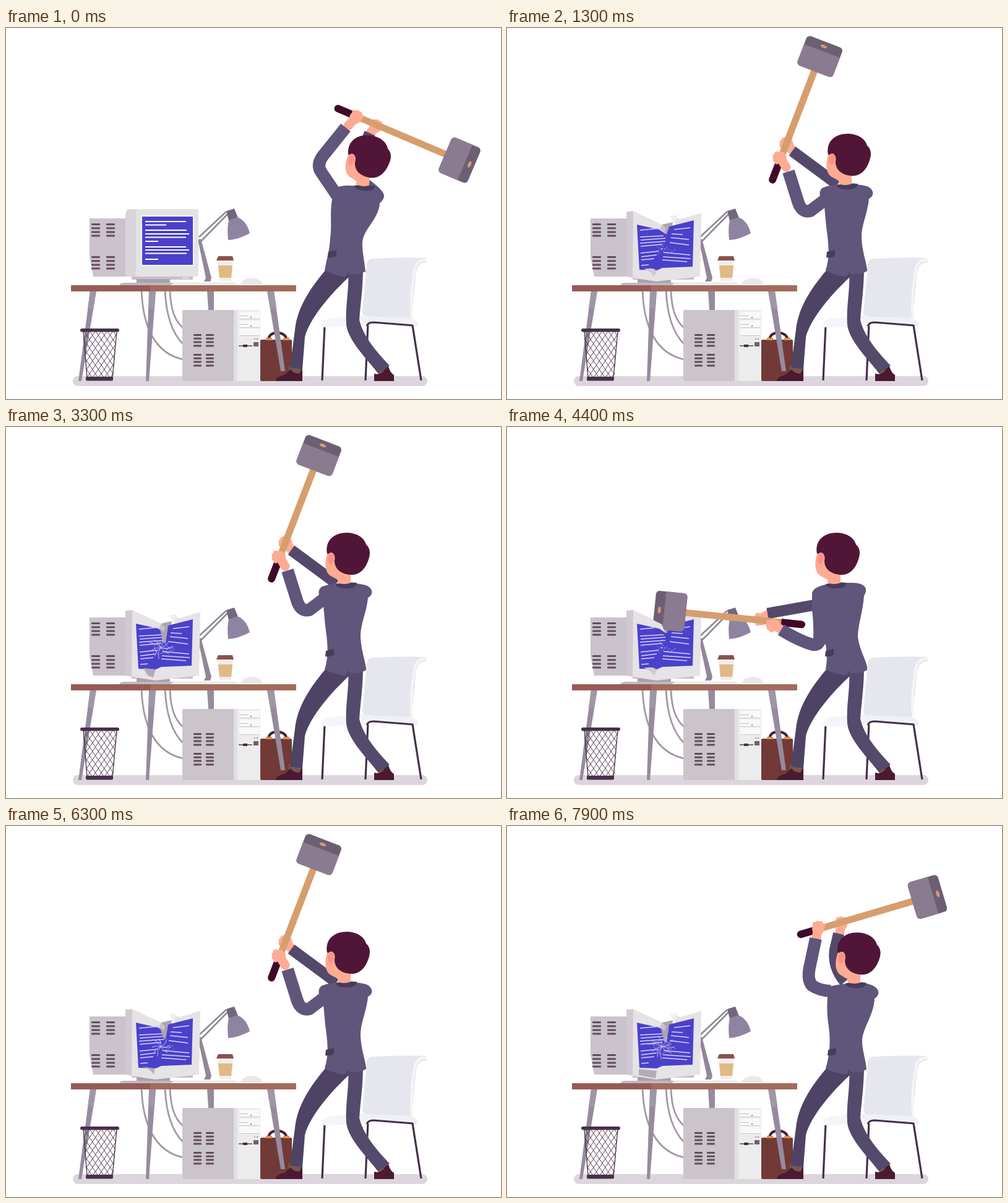
Animation, 800 px wide and 600 px high, one loop 8000 ms. Source, as an HTML page with a canvas:

```html
<!DOCTYPE html>
<html lang="en">
<head>
<meta charset="utf-8">
<title>Office rage</title>
<style>
html, body { margin: 0; width: 100%; height: 100%; overflow: hidden; background: #fff; }
canvas { display: block; }
</style>
</head>
<body>
<canvas id="stage" width="800" height="600"></canvas>
<script>
const ctx = document.getElementById('stage').getContext('2d');

const SUIT = '#60557a', SUIT_DARK = '#54496b', COLLAR = '#463c5c';
const SKIN = '#fdab92', HAIR = '#511637', METAL = '#91869a', DARK = '#44304a';

function fill(d, color) {
  ctx.fillStyle = color;
  ctx.fill(new Path2D(d));
}

function line(d, color, width, cap = 'butt') {
  ctx.strokeStyle = color;
  ctx.lineWidth = width;
  ctx.lineCap = cap;
  ctx.lineJoin = 'round';
  ctx.stroke(new Path2D(d));
}

function box(x, y, w, h, color, r = 0) {
  ctx.fillStyle = color;
  ctx.beginPath();
  ctx.roundRect(x, y, w, h, r);
  ctx.fill();
}

function oval(x, y, rx, ry, color, turn = 0) {
  ctx.fillStyle = color;
  ctx.beginPath();
  ctx.ellipse(x, y, rx, ry, turn, 0, Math.PI * 2);
  ctx.fill();
}

function vents(x1, x2, w, y, gap, pitch) {
  for (const x of [x1, x2])
    for (const top of [y, y + gap])
      for (let i = 0; i < 4; i++) box(x, top + i * pitch, w, 3, '#634c5d', 1);
}

function random(seed) {
  return () => (seed = (seed * 16807) % 2147483647) / 2147483647;
}

// Furniture

function drawChair() {
  line('M515 481L511 570', DARK, 3.2);
  line('M585 478L581 570', DARK, 3.2);
  fill('M510 484Q509 470 528 469L580 465L600 474L584 482Z', '#f4f5f9');
  fill('M592 373Q584 374 583 382L576 460Q576 465 582 466L655 473L663 394Q666 379 680 379L679 372Q645 370 592 373Z', '#e6e7ee');
  line('M680 375Q662 374 660 394Q653 435 656 468', '#f5f5f8', 4);
  fill('M571 466L655 469Q667 474 666 480Q664 484 658 482L586 475Q575 476 571 470Z', '#f0f1f5');
  line('M583 482Q585 476 594 476L657 481L671 570', DARK, 3.2);
}

function drawBin() {
  ctx.save();
  ctx.clip(new Path2D('M124 490H180L173 567H130Z'));
  let mesh = '';
  for (let x = 40; x < 270; x += 9.5) mesh += `M${x} 490l55 80M${x} 490l-55 80`;
  line(mesh, '#553d52', 1);
  ctx.restore();
  line('M125 490L131 566M179 490L172 566', DARK, 1.3);
  box(120, 486, 63, 5.5, '#47304a', 3);
  box(129, 564, 44, 6.5, '#47304a', 2);
}

function drawTower() {
  box(285, 456, 126, 115, '#cbc5cb', 2);
  box(368, 456, 6, 115, '#e2dfe3');
  box(374, 456, 37, 115, '#ececec', 1);
  vents(303, 323, 13, 495, 32, 5.8);
  for (const y of [459, 473, 486]) {
    box(377, y, 33, 11, '#f8f8f8');
    box(377, y + 11, 33, 1, '#cbc7cc');
    if (y < 486) {
      box(377, y + 6, 14, 1, '#c3bec5');
      oval(396, y + 9, 1.2, 1, '#d2643f');
    }
  }
  box(376, 513, 22, 2, '#796d79');
  box(383, 512, 7, 4, '#3e303e');
  box(400, 508, 8, 7, '#6e6270');
  oval(402, 503, 1, 1, '#d2643f');
  oval(406, 503, 1, 1, '#796d79');
}

function drawCase() {
  line('M424 505Q425 493 438 493Q452 493 454 505', '#43203a', 4);
  box(411, 504, 51, 67, '#713a37', 2);
  box(420, 501, 10, 4, '#dc8f4b');
  box(448, 501, 10, 4, '#dc8f4b');
}

function drawLamp() {
  line('M312 338L356 297M314 346L359 300', METAL, 2.6);
  fill('M310 342L315 341L332 404L330 410H320L323 404Z', METAL);
  fill('M356 296L369 292L375 307L360 312Z', '#73677a');
  fill('M360 311L374 306Q389 312 394 332Q376 342 359 343Q357 322 360 311Z', '#8e84a1');
}

function drawDesk() {
  line('M219 424C221 482 240 526 286 536M257 424C259 470 270 495 286 511M265 424C266 458 274 474 286 485', '#a298a7', 2.8);
  drawTower();
  drawCase();
  for (const leg of [
    'M136 425H146L122 571H117Z', 'M231 425H242L231 571H226Z',
    'M325 425H336V456H327Z', 'M422 425H433L451 555H444Z'
  ]) fill(leg, '#968b9e');
  fill('M136 425H146L141 454H132Z', '#a096a6');
  fill('M231 425H242L240 454H231Z', '#a096a6');
  fill('M422 425H433L437 454H427Z', '#a096a6');
  drawBin();
  box(105, 416, 364, 10, '#a26c5c', 1);
  box(105, 416, 128, 10, '#985b57', 1);
  fill('M183 416Q184 412 192 412H272V416Z', '#bfb8c1');
  fill('M266 416L272 411H370L374 416Z', '#eeecef');
  fill('M379 414Q383 404 398 404Q413 405 414 415H384Z', '#e9e8eb');
}

function drawCup() {
  fill('M342 376H367L364 409H345Z', '#efedec');
  fill('M343 384H366L364 404H345Z', '#e0b985');
  fill('M343 369H366L368 376H340Z', '#8a5149');
}

// Computer

function drawMonitor(damage) {
  fill('M135 308H195V402H141L135 371Z', '#cac3cc');
  vents(138, 162, 14, 316, 53, 6.2);
  box(203, 401, 99, 6, '#c6bfc8', 1);
  box(211, 406, 54, 6, '#a9a0ab');
  if (damage) drawBroken(damage);
  else drawIntact();
}

function drawIntact() {
  fill('M193 301L196 293H212V402H193Z', '#d9d3da');
  box(210, 293, 101, 109, '#e4e3e4', 3);
  box(218, 303, 86, 82, '#f3f2f3', 2);
  box(220, 305, 82, 78, '#4b40ca', 1);
  const rows = [[313, 66], [318.5, 34], [327, 67], [333, 71], [338.5, 66], [345, 21], [354, 66], [359, 71], [364.5, 67], [374, 21]];
  for (const [y, w] of rows) box(225, y - 1, w, 2, '#fff');
  box(285, 403, 11, 3, '#dedade');
}

function drawBroken(damage) {
  fill('M193 297L204 296L214 406L193 402Z', '#d0c9d1');
  fill('M250 318L268 314L264 350L252 347Z', '#ada4ae');
  fill('M204 296L251 318L256 333L262 321L273 318L264 305L281 309L314 299L312 402L241 410L203 404Z', '#e5e3e5');
  fill('M263 304L276 303L272 314Z', '#f1eff1');
  fill('M210 318L246 326L256 333L262 321L302 311L300 386L251 388L242 392L214 391Z', '#4b40ca');
  line('M215 327L246 324M215 338L253 336M216 343L256 340M215 348L256 345M216 353L251 350M216 364L245 361M217 370L242 367M217 375L238 373M217 384L229 383', '#d5d2fa', 1.6);
  line('M270 326L296 323M266 333L284 334M265 339L294 342M263 347L294 351M253 363L296 367M252 370L297 373M251 375L291 378', '#d5d2fa', 1.6);
  const tip = [0, 334, 345, 350, 351][damage];
  fill(`M248 324L262 322L258 ${tip}L254 ${tip - 3}Z`, '#aca4af');
  fill('M247 325L251 318L257 324L255 331Z', '#c8c1c9');

  const chips = [
    'M221 390Q239 386 242 394L237 403Q235 394 221 390Z',
    'M220 389L240 392L239 402Q233 392 220 389Z',
    'M222 390L242 392L238 405L229 402Z',
    'M213 393L242 396L240 408L213 403Z'
  ];
  fill(chips[damage - 1], damage < 2 ? '#cfc9d0' : '#b4abb7');
  drawCracks(damage);
}

function drawCracks(damage) {
  const rnd = random(73);
  const reach = [0, 11, 18, 21, 23][damage];
  const rays = 7 + damage;
  let web = '', ring = '';
  for (let i = 0; i < rays; i++) {
    const a = i / rays * Math.PI * 2 + rnd() * 0.5;
    const r = reach * (0.7 + rnd() * 0.35);
    const at = (k, turn) => `${250 + Math.cos(a + turn) * r * k} ${357 + Math.sin(a + turn) * r * k * 0.85}`;
    web += `M250 357L${at(0.5, 0.25)}L${at(1, 0)}`;
    ring += (i ? 'L' : 'M') + at(0.6, 0.1);
  }
  if (damage === 1) ctx.setLineDash([1.5, 2.5]);
  line(web, '#c5c1f2', 0.9);
  ctx.setLineDash([]);
  if (damage > 2) line(ring + 'Z', '#b5b0ee', 0.7);
  for (let i = 0; i < 5; i++) box(259 + i * 3, 355 + rnd() * 6, 1.2, 1.2, '#c5c1f2');
}

// Worker

const HEM = 'L582 393Q571 400 556 398L553 393Q552 400 547 402Q530 400 515 392';
const POSES = {
  back: {
    hammer: [531, 128, 23], head: [30, 2, 5], pocket: 521,
    torso: 'M528 262Q538 253 560 255L580 256L588 246Q612 264 611 272Q610 279 604 283C603 308 578 325 576 346C575 362 580 378 581 396' + HEM + 'C518 374 523 360 524 340C527 320 523 300 527 277Z',
    far: 'M588 170L573 203', near: 'M549 161L512 207Q501 222 510 234L535 271',
    farHand: [597, 160, 590, 168, -55], nearHand: [565, 145, 553, 158, -55]
  },
  high: {
    hammer: [469, 177, -16.5], head: [14, 1, 2], pocket: 519,
    torso: 'M519 260Q545 253 575 254C590 255 603 263 600 272Q598 277 594 279C593 306 574 328 574 348C574 363 580 378 581 394' + HEM + 'C522 370 523 345 520 325C517 305 517 290 518 277Z',
    far: 'M536 174L530 200Q526 228 546 252', near: 'M499 182L489 229Q485 249 493 258Q505 266 523 267',
    farHand: [540, 159, 538, 172, -75], nearHand: [503, 166, 500, 180, -80]
  },
  front: {
    hammer: [427, 251, -69], head: [0, 0, 0], pocket: 517,
    torso: 'M511 258C524 252 562 250 582 256C594 261 594 272 585 276C583 300 572 320 573 340C574 361 580 376 582 390' + HEM + 'C522 370 520 350 516 322L512 278C503 273 504 262 511 258Z',
    far: 'M461 199L534 253', near: 'M455 232L471 283Q477 299 490 296L515 277',
    farHand: [453, 188, 460, 197, -145], nearHand: [442, 210, 451, 225, 180]
  },
  hit: {
    hammer: [482, 320, 185.8], head: [-18, 0, 0], pocket: 515,
    torso: 'M493 268Q495 260 510 256C525 252 545 252 560 252C580 253 584 262 577 273C575 300 567 320 567 340C570 361 580 376 582 388' + HEM + 'C518 374 517 365 515 352L495 342Q496 320 493 295Z',
    far: 'M421 301.5Q458 295 502 287', near: 'M443 328Q473 346 494 352Q506 354 506 339L508 305',
    farHand: [411, 311, 420, 304, 180], nearHand: [431, 320, 442, 327, 160]
  }
};

function drawLegs() {
  fill('M457 545L478 546V562H457Z', '#79564f');
  fill('M436 571Q436 564 450 561L460 552Q464 559 474 559L479 550V571Z', '#4a1a31');
  fill('M597 553L616 544L621 556L605 563Z', '#79564f');
  fill('M595 571V559Q607 562 612 552L618 547Q621 558 627 561V571Z', '#4a1a31');
  fill('M517 391C494 418 471 450 467 488L459 549L479 552L483 500C489 476 514 440 555 402V388Z', '#4e4365');
  fill('M552 388H577C577 420 573 445 571 472C577 500 604 529 620 546L601 558C584 536 553 506 550 480C548 448 555 424 553 392Z', '#544a6c');
}

function drawHead([x, y, turn]) {
  ctx.save();
  ctx.translate(x + 547, y + 250);
  ctx.rotate(turn * Math.PI / 180);
  ctx.translate(-547, -250);
  fill('M533 254Q550 250 567 252Q566 261 550 261Q534 261 533 254Z', COLLAR);
  fill('M520 203C514 219 515 235 525 241Q533 245 536 247V252Q546 256 557 252V230Z', SKIN);
  fill('M519 205C515 183 531 171 550 171C567 171 579 179 582 190C590 197 589 207 585 217C580 231 570 240 557 239C542 238 530 230 531 214Q525 203 519 205Z', HAIR);
  oval(525, 213, 6.5, 10, SKIN, 0.1);
  oval(525, 213, 5, 8.5, '#fb9187', 0.1);
  ctx.restore();
}

function drawHammer([x, y, turn]) {
  ctx.save();
  ctx.translate(x, y);
  ctx.rotate(turn * Math.PI / 180);
  box(34, -5.5, 165, 11, '#d69e6d');
  box(0, -6, 39, 12, '#3f0a29', [6, 0, 0, 6]);
  box(194, -31, 51, 62, '#6c5f74', 6);
  box(194, -31, 35, 62, '#8b7b90', [6, 0, 0, 6]);
  oval(237, 0, 2.5, 5.5, '#d69e6d');
  ctx.restore();
}

function drawHand([x, y, wx, wy, turn]) {
  line(`M${wx} ${wy}L${x} ${y}`, SKIN, 15, 'round');
  oval(x, y, 10, 10, SKIN);
  const a = turn * Math.PI / 180;
  for (let i = -1.5; i < 2; i++) {
    oval(x + Math.cos(a + i * 0.55) * 9, y + Math.sin(a + i * 0.55) * 9, 3.8, 3.8, SKIN);
  }
}

function drawWorker(pose) {
  const p = POSES[pose];
  drawHand(p.farHand);
  line(p.far, SUIT_DARK, 18);
  drawLegs();
  fill(p.torso, SUIT);
  fill(`M${p.pocket} 362L${p.pocket + 13} 359V368Q${p.pocket + 9} 372 ${p.pocket - 1} 371Z`, COLLAR);
  drawHead(p.head);
  drawHammer(p.hammer);
  // The struck frame edge covers the hammer's lower corner.
  if (pose === 'hit') fill('M204 296L250 319L255 331L246 326L211 318Z', '#e5e3e5');
  drawHand(p.nearHand);
  line(p.near, SUIT, 20);
}

// Each swing takes ten steps; four blows wreck the screen, then it is whole again.
const STEP = 100;
const SWING = ['back', 'back', 'high', 'front', 'hit', 'hit', 'hit', 'front', 'front', 'high'];

function draw(time) {
  const step = Math.floor((time % 8000) / STEP);
  const damage = Math.floor((step % 40 + 6) / 10);
  ctx.fillStyle = '#fff';
  ctx.fillRect(0, 0, 800, 600);
  box(108, 563, 573, 16, '#dcd5dd', 8);
  drawChair();
  drawDesk();
  drawLamp();
  drawMonitor(damage);
  drawCup();
  drawWorker(SWING[step % 10]);
}

let start;
function loop(now) {
  start ??= now;
  draw(now - start);
  requestAnimationFrame(loop);
}
requestAnimationFrame(loop);
</script>
</body>
</html>
```
